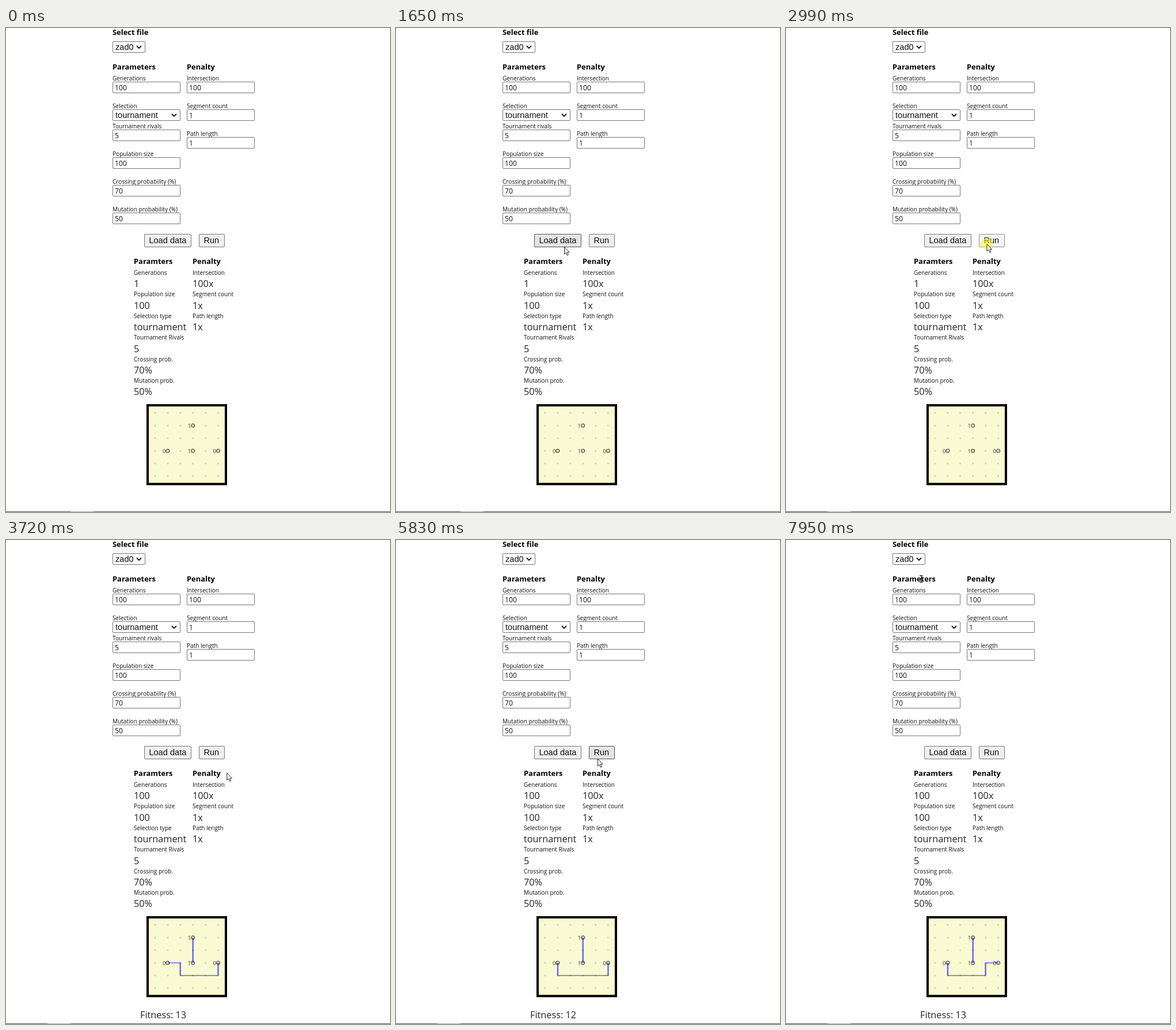
Write an HTML page that moves like this. It is 667 px wide and 839 px high and loops after 8 s.

```html
<!DOCTYPE html>
<html lang="en">
<head>
<meta charset="utf-8">
<title>Genetic algorithm panel</title>
<style>
html, body { margin: 0; width: 100%; height: 100%; overflow: hidden; background: #fff; }
svg { display: block; width: 667px; height: 839px; }
text { font-family: "Open Sans", "Noto Sans", sans-serif; fill: #111; white-space: pre; }
.head { font-size: 12.9px; font-weight: 700; fill: #000; }
.label { font-size: 10.1px; }
.field { font-size: 12.2px; }
.value { font-size: 16.3px; fill: #222; }
.control { font-family: "Liberation Sans", Arial, sans-serif; font-size: 14.6px; fill: #111; }
.pin { font-size: 9.5px; fill: #333; }
</style>
</head>
<body>
<svg id="stage" viewBox="0 0 667 839"></svg>
<script>
const LOOP = 8000, STEP = 66;
const stage = document.getElementById('stage');

function add(tag, attrs, content = '') {
  const node = document.createElementNS('http://www.w3.org/2000/svg', tag);
  for (const key in attrs) node.setAttribute(key, attrs[key]);
  node.textContent = content;
  return stage.appendChild(node);
}
const text = (x, y, content, cls) => add('text', { x, y, class: cls }, content);
const show = (node, on) => node.setAttribute('visibility', on ? 'visible' : 'hidden');

// Boxes keep their outer edges on whole pixels.
function box(x, y, w, h, fill = '#fff') {
  const node = add('rect', { x: x + .5, y: y + .5, width: w - 1, height: h - 1, rx: 1.5, fill, stroke: '#767676' });
  return { node, x, y, w, h };
}
const inside = (x, y, r) => x >= r.x && x <= r.x + r.w && y >= r.y && y <= r.y + r.h;

// Input form
const inputs = [];
function fields(x, top, rows) {
  rows.forEach(([label, value], i) => {
    const y = Math.round(top + i * 48.1);
    text(x, y, label, 'label');
    inputs.push(box(x, y + 2, 118, 20));
    text(x + 4, y + 16.7, value, 'field');
  });
}
function select(x, y, w, value) {
  box(x, y, w, 20);
  text(x + 5, y + 15, value, 'control');
  add('path', { d: `M${x + w - 15} ${y + 8}l4 4l4 -4`, fill: 'none', stroke: '#111', 'stroke-width': 1.8 });
}
text(185, 12, 'Select file', 'head');
select(185, 23, 57, 'zad0');
text(185, 72, 'Parameters', 'head');
text(314, 72, 'Penalty', 'head');
fields(185, 91, [['Generations', '100']]);
text(185, 139, 'Selection', 'label');
select(185, 141, 118, 'tournament');
fields(185, 174, [['Tournament rivals', '5'], ['Population size', '100'],
  ['Crossing probability (%)', '70'], ['Mutation probability (%)', '50']]);
fields(314, 91, [['Intersection', '100'], ['Segment count', '1'], ['Path length', '1']]);

function button(x, w, label) {
  const result = box(x, 357, w, 23, '#efefef');
  text(x + 8.4, 373, label, 'control');
  return result;
}
const buttons = [button(240, 82, 'Load data'), button(335, 45, 'Run')];

// Summary
function summary(x, title, rows) {
  text(x, 409.3, title, 'head');
  return rows.map(([label, value], i) => {
    text(x, 428 + i * 37.45, label, 'label');
    return text(x, 449.2 + i * 37.45, value, 'value');
  });
}
const [generation] = summary(222, 'Paramters', [
  ['Generations', '1'], ['Population size', '100'], ['Selection type', 'tournament'],
  ['Tournament Rivals', '5'], ['Crossing prob.', '70%'], ['Mutation prob.', '50%']]);
summary(324, 'Penalty', [['Intersection', '100x'], ['Segment count', '1x'], ['Path length', '1x']]);

// Board
const gx = c => 259 + c * 21.9, gy = r => 667.3 + r * 21.9;
add('rect', { x: 246, y: 654, width: 136, height: 136.5, fill: '#fafad2', stroke: '#000', 'stroke-width': 4 });
for (let i = 0; i < 36; i++)
  add('circle', { cx: gx(i % 6), cy: gy(Math.floor(i / 6)), r: 1.7, fill: '#d3d3d3' });
function pin(c, r, id) {
  text(gx(c) - 9, gy(r) + 3.5, id, 'pin');
  add('circle', { cx: gx(c), cy: gy(r), r: 3, fill: 'none', stroke: '#111' });
}
pin(3, 1, 1);
pin(3, 3, 1);
pin(1, 3, 0);
pin(5, 3, 0);
const wire = width =>
  add('path', { fill: 'none', stroke: '#00f', 'stroke-opacity': .6, 'stroke-width': width });
const vertical = wire(2.4), horizontal = wire(1.5);
const fitness = text(233, 829, '', 'value');
add('rect', { y: 838, width: 667, height: 1, fill: '#555' });
const gap = add('rect', { y: 838, width: 40, height: 1, fill: '#aaa' });

// The outer net drops at one column and rises at another.
function drawRoute(route) {
  const [down, up] = route;
  const column = (c, from, to) => `M${gx(c)} ${gy(from)}V${gy(to)}`;
  const row = (r, from, to) => `M${gx(from)} ${gy(r)}H${gx(to)}`;
  vertical.setAttribute('d', column(3, 1, 3) + column(down, 3, 4) + column(up, 3, 4));
  horizontal.setAttribute('d', row(3, 1, down) + row(4, down, up) + row(3, up, 5));
  const length = 2 + 6, segments = 1 + 3 + (down > 1) + (up < 5);
  fitness.textContent = `Fitness: ${length + segments}`;
}

// Pointer
const halo = add('circle', { r: 10, fill: '#ff0', 'fill-opacity': .5 });
const arrow = add('path', { d: 'M.5 .5V13L3.3 10.4L5.3 15L7.4 14.1L5.4 9.7H9.2Z', fill: '#fff', stroke: '#222' });
const beam = add('path', { d: 'M-3 -6H-1L0 -5L1 -6H3M0 -5V5M-3 6H-1L0 5L1 6H3', fill: 'none', stroke: '#111', 'stroke-width': 1.2 });

const entry = { x: 618, y: 825 };
const moves = [
  { start: 130, end: 1650, to: { x: 292, y: 379 } },
  { start: 2120, end: 2390, to: { x: 348.5, y: 374 } },
  { start: 3450, end: 4050, to: { x: 416, y: 431 } },
  { start: 4250, end: 4380, to: { x: 350, y: 384 } },
  { start: 5170, end: 5440, to: { x: 350, y: 379 } },
  { start: 7030, end: 7880, to: { x: 257, y: 100.5 }, via: { x: 620, y: 440 } },
  { start: 7880, end: 7950, to: { x: 235, y: 67.5 } }];
const clicks = [
  { down: 1850, up: 2120 },
  { down: 2990, up: 3450, route: [2, 5] },
  { down: 4580, up: 4710 },
  { down: 5440, up: 5830, route: [1, 5] },
  { down: 6430, up: 6890, route: [1, 4] }];

const mix = (a, b, k) => ({ x: a.x + (b.x - a.x) * k, y: a.y + (b.y - a.y) * k });
function pointerAt(t) {
  let at = entry;
  for (const { start, end, to, via } of moves) {
    if (t < start) break;
    const linear = t >= end ? 1 : Math.floor((t - start) / STEP) * STEP / (end - start);
    const k = 1 - (1 - linear) ** 1.25;
    at = via ? mix(mix(at, via, k), mix(via, to, k), k) : mix(at, to, k);
  }
  return at;
}

function render(t) {
  const visible = t >= 130;
  const { x, y } = pointerAt(t);
  const pressed = clicks.some(c => t >= c.down && t < c.up);
  const editing = t >= 7950 || inputs.some(r => inside(x, y, r));
  for (const node of [halo, arrow, beam]) node.setAttribute('transform', `translate(${x} ${y})`);
  show(halo, pressed);
  show(arrow, visible && !editing);
  show(beam, visible && editing);

  for (const b of buttons) {
    const over = inside(x, y, b);
    b.node.setAttribute('fill', !over ? '#efefef' : pressed ? '#f5f5f5' : '#e5e5e5');
    b.node.setAttribute('stroke', !over ? '#767676' : pressed ? '#8d8d8d' : '#4f4f4f');
  }

  const run = clicks.filter(c => c.route && t >= c.up).pop();
  generation.textContent = run ? '100' : '1';
  for (const node of [vertical, horizontal, fitness]) show(node, run);
  if (run) drawRoute(run.route);
  gap.setAttribute('x', t < 1850 ? 112 : 72);
}

const start = performance.now();
function frame() {
  render((performance.now() - start) % LOOP);
  requestAnimationFrame(frame);
}
render(0);
requestAnimationFrame(frame);
</script>
</body>
</html>
```
